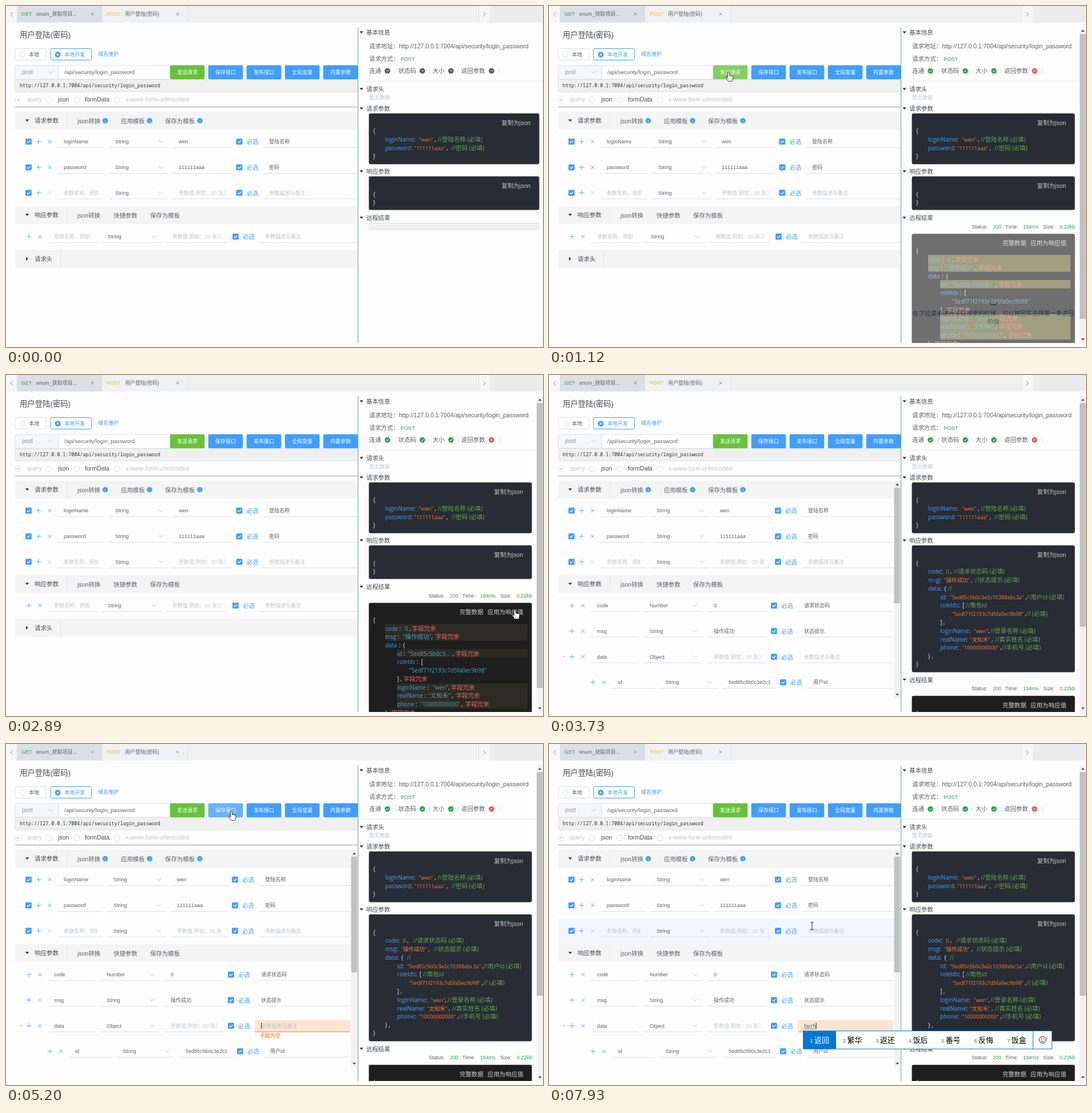
These frames come from a looping animation (939x596 px, 8000 ms). An HTML page:

```html
<!DOCTYPE html>
<html lang="zh-CN">
<head>
<meta charset="utf-8">
<title>API console</title>
<style>
html, body { margin: 0; width: 100%; height: 100%; overflow: hidden; background: #fdfdfd; }
svg { display: block; }
text { white-space: pre; font-kerning: none; font-family: "Liberation Sans", "Noto Sans CJK SC", sans-serif; }
.mono { font-family: "Noto Sans Mono", monospace; }
.code { font-family: "Open Sans", "Noto Sans CJK SC", sans-serif; }
.k { fill: #409eff; } .p { fill: #e8e8e8; } .s { fill: #ff7a2c; font-size: 9.1px; } .c { fill: #5fa850; }
.v { fill: #45a3bd; } .r { fill: #f56c6c; }
</style>
</head>
<body>
<svg id="stage" width="939" height="596"></svg>
<script>
const BLUE = '#409eff', INK = '#606266', DARK = '#4a4c50', PALE = '#c0c4cc', LINE = '#dcdfe6', GREEN = '#28a745';
const USER = 'wen', PERSON = '文知禾', PHONE = '10000000000';
const URL_PATH = '/api/security/login_password', FULL_URL = 'http://127.0.0.1:7004' + URL_PATH;
const MID = 10.45;

// Drawing helpers, all returning SVG markup
const text = (x, y, s, size = 9, fill = INK, more = '') =>
  `<text x="${x}" y="${y}" font-size="${size}" fill="${fill}" ${more}>${s}</text>`;
const centered = (x, y, s, size, fill) => text(x, y, s, size, fill, 'text-anchor="middle"');
const rect = (x, y, x2, y2, fill, stroke = 'none', r = 0, more = '') =>
  `<rect x="${x}" y="${y}" width="${x2 - x}" height="${y2 - y}" rx="${r}" fill="${fill}" stroke="${stroke}" ${more}/>`;
const path = (d, stroke, fill = 'none', w = 1) => `<path d="${d}" stroke="${stroke}" fill="${fill}" stroke-width="${w}"/>`;
const dot = (x, y, r, fill, stroke = 'none') => `<circle cx="${x}" cy="${y}" r="${r}" fill="${fill}" stroke="${stroke}"/>`;
const group = (id, body, more = '') => `<g id="${id}" ${more}>${body}</g>`;
const clip = (x, y, w, h, body) =>
  `<svg x="${x}" y="${y}" width="${w}" height="${h}" viewBox="${x} ${y} ${w} ${h}" overflow="hidden">${body}</svg>`;
const hline = (x, x2, y, color = LINE) => path(`M${x} ${y}H${x2}`, color);
const down = (x, y, r = 3.3, fill = '#303133') => path(`M${x - r} ${y - r / 2}h${2 * r}l${-r} ${r * 1.1}z`, 'none', fill);
const chevron = (x, y) => path(`M${x - 4} ${y - 2}l4 4l4 -4`, PALE);
const cross = (x, y, r, color) => path(`M${x - r} ${y - r}l${2 * r} ${2 * r}m0 ${-2 * r}l${-2 * r} ${2 * r}`, color, 'none', .9);
const plus = (x, y) => path(`M${x - 4.5} ${y}h9m-4.5 -4.5v9`, BLUE, 'none', .8);
const check = (x, y) => rect(x, y - 5.3, x + 10.8, y + 5.3, BLUE, 'none', 1.5) +
  path(`M${x + 2.8} ${y}l2 2.2l3.6 -4`, '#fff', 'none', 1.2);

// Code line: numbers set the next x, strings start with their colour class
function code(y, ...parts) {
  let x = '', out = '';
  for (const p of parts) {
    if (typeof p === 'number') { x = `x="${p}"`; continue; }
    const size = p[0] === 's' ? 9.4 : MID;
    const body = p.slice(1).replace(/[\u4e00-\u9fff]+/g, `<tspan font-size="${size}">$&</tspan>`);
    out += `<tspan ${x} class="${p[0]}">${body}</tspan>`;
    x = '';
  }
  return `<text class="code" y="${y}" font-size="9.9">${out}</text>`;
}

// Parameter row; spans = name, type and value underlines, checkbox x, description underline
function row(y, [n0, n1, t0, t1, v0, v1, c, d0, d1], name, type, value, desc, lead) {
  const field = (x, x2, s, hint) => hline(x, x2, y + 10.5) +
    clip(x, y - 9, x2 - x - 10.5, 18, text(x + 11, y + 3, s || hint, 9, s ? INK : PALE));
  return (lead ? check(34, y) : '') + plus(n0 - 33, y) + cross(n0 - 13.7, y, 3, lead && !name ? PALE : BLUE) +
    field(n0, n1, name, '参数名称、例如') + field(t0, t1, type) + chevron(t1 - 13, y) +
    field(v0, v1, value, '参数值,例如：20 张三') + check(c, y) + text(c + 18, y + 4, '必选', MID, BLUE) +
    field(d0, d1, desc, '参数描述与备注');
}

function sectionHead(y, x2, label, cell, tabs, open = true) {
  return rect(16, y, x2, y + 31, '#f4f4f5') + path(`M${cell}.5 ${y}v31`, '#e4e7ed') +
    (open ? down(37, y + 15) : path(`M35 ${y + 12}v6.6l3.6 -3.3z`, 'none', '#303133')) +
    text(50, y + 19, label, MID, DARK) + tabs.map(([x, s]) => text(x, y + 19.5, s, MID, INK)).join('');
}

function requestSide(x2, spans) {
  return sectionHead(185, x2, '请求参数', 106, [[125, 'json转换'], [201, '应用模板'], [278, '保存为模板']]) +
    [173.5, 251, 339].map(x => dot(x, 200.5, 4.7, BLUE) + centered(x, 203.5, '!', 8, '#fff')).join('') +
    row(237, spans, 'loginName', 'String', USER, '登陆名称', true) +
    row(282, spans, 'password', 'String', '111111aaa', '密码', true) +
    row(326.5, spans, '', 'String', '', '', true) +
    sectionHead(350, x2, '响应参数', 106, [[125, 'json转换'], [188, '快捷参数'], [252, '保存为模板']]);
}

function scrollbar(id, x, y, y2, thumb) {
  return rect(x, y, x + 11, y2, '#f1f1f1') + `<rect id="${id}" x="${x}" y="${y + 12}" width="10.5" height="${thumb}" fill="#c1c1c1"/>` +
    path(`M${x + 2.5} ${y + 8}h6l-3 -3.4z`, 'none', '#505050') + path(`M${x + 2.5} ${y2 - 8}h6l-3 3.4z`, 'none', '#505050');
}

const SPLIT_X = 615;
const topBar = rect(0, 0, 939, 28.5, '#f0f0f1') + rect(0, 0, 19, 28, '#f7f7f7') + rect(19, 0, 167.5, 28.5, '#dcdfe5') +
  rect(168, 0, 317, 28.5, '#eff1f4') + rect(826, 0, 846, 28, '#f7f7f7') + rect(846, 0, 939, 28.5, '#ececed') +
  path('M19.5 0v28M167.5 0v28M317.5 0v28M826.5 0v28', LINE) +
  path('M12 10.5l-4 4l4 4M834.5 10.5l4 4l-4 4', '#808387') +
  text(27, 17, 'GET', 9, GREEN) + text(53, 17, 'enum_获取项目...') + cross(151, 14, 2.4, '#808387') +
  text(176, 17, 'POST', 9, '#ffb428') + text(208, 17, '用户登陆(密码)') + cross(300, 14, 2.4, '#808387');

const button = (x, s, fill, id = '') => rect(x - .3, 103.5, x + 60.3, 128, fill, 'none', 2, id && `id="${id}"`) +
  centered(x + 30, 119, s, 9, '#fff');
const ring = (x, y, r, stroke = LINE) => dot(x, y, r, '#fff', stroke);

const formTop = text(24, 55, '用户登陆(密码)', 13.35, DARK) +
  rect(16, 74.5, 70, 94.5, '#fff', LINE, 2) + ring(28.5, 85, 4.5) + text(40, 88, '本地') +
  rect(78, 74.5, 149.5, 94.5, '#fff', BLUE, 2) + dot(90.5, 85, 5, BLUE) + dot(90.5, 85, 1.8, '#fff') +
  text(102, 88, '本地开发', 9, BLUE) + text(161, 87, '域名维护', 9, BLUE) +
  rect(16, 104, 92, 128, '#f5f7fa', LINE, 2) + text(28, 118.5, 'post', 10, '#909399') + chevron(78, 115.5) +
  rect(92, 104, 288, 128, '#fff', LINE) + text(102, 118.5, URL_PATH, 9.8) +
  button(287, '发送请求', '#67c23a', 'send') + button(354, '保存接口', BLUE, 'save') +
  button(421, '发布接口', BLUE) + button(488, '全局变量', BLUE) + button(555, '内置参数', BLUE) +
  rect(16, 128.5, 615, 150, '#f0f0f0', LINE, 2) + text(24, 142, FULL_URL, 8.37, '#303133', 'class="mono"') +
  [21, 75, 123.5, 194].map(x => ring(x, 164, 5)).join('') + dot(21, 164, 1.5, PALE) +
  text(37, 167, 'query', 10.2, PALE) + text(91, 167, 'json', MID, DARK) + text(138, 167, 'formData', MID, DARK) +
  text(209, 167, 'x-www-form-urlencoded', MID, PALE) + hline(16, SPLIT_X, 176.5, '#999');

const hovers = [215, 260, 305].map((y, i) =>
  rect(16, y, 603, y + 44.5, '#f3f6fb', 'none', 0, `id="hover${i}"`)).join('');

const REQ_WIDE = [90, 172, 180, 284, 291, 395, 402.5, 449, 615], REQ_SLIM = [90, 170, 177, 280, 288, 388, 395, 442, 602];
const RES_WIDE = [73, 160, 167, 272, 280, 387, 396, 442, 615], RES_SLIM = [73, 157, 165, 268, 277, 381, 388, 435, 602];
const RES_CHILD = [110, 186, 193, 294, 303, 397, 404, 451, 602];

const leftBefore = requestSide(SPLIT_X, REQ_WIDE) + row(403, RES_WIDE, '', 'String', '', '') +
  sectionHead(426.5, SPLIT_X, '请求头', 95, [], false);
const leftAfter = requestSide(603, REQ_SLIM) +
  row(403, RES_SLIM, 'code', 'Number', '0', '请求状态码') +
  row(447.5, RES_SLIM, 'msg', 'String', '操作成功', '状态提示') +
  row(492.5, RES_SLIM, 'data', 'Object', '', ' ') + down(26, 492.5, 2.6, PALE) +
  row(537, RES_CHILD, 'id', 'String', '5ed85c5b0c3e2c10388ebc3a', '用户id') +
  scrollbar('leftThumb', 603.5, 185, 565, 202);
const errorField = rect(435, 482.5, 602, 503, '#fde4d0') + hline(435, 602, 503, '#fb8a3c') +
  text(444, 512.5, '不能为空', 9, '#fa6c0c');

const rightHead = (y, s) => down(621.5, y - 4) + text(630, y, s, MID, DARK);
const darkBox = (y, y2, x2, fill = '#282c34') => rect(634.5, y - .3, x2 + .5, y2 + .5, fill, 'none', 3);
const copyLabel = (x, y) => text(x, y, '复制为json', MID, '#c4c6ca', 'text-anchor="end"');

const rightStatic = path('M615.5 37V589', '#5fab9b') + rightHead(50, '基本信息') +
  text(635, 74, '请求地址：', MID) + text(687, 74, FULL_URL, MID) +
  text(635, 95.5, '请求方式：', MID) + text(690, 95.5, 'POST', 9.2, GREEN) +
  [[635, '连通'], [686, '状态码'], [746, '大小'], [796, '返回参数']].map(([x, s]) => text(x, 117, s, MID)).join('') +
  path('M680.5 109v9M740.5 109v9M790.5 109v9M862.5 109v9', LINE) +
  hline(616, 939, 131.5, '#e4e7ed') + rightHead(149, '请求头') + text(635, 163, '暂无数据', 9, PALE) +
  rightHead(183, '请求参数') + rightHead(293, '响应参数');

const requestBox = x2 => darkBox(188, 276, x2) + copyLabel(x2 - 15, 207.5) + code(222, 642, 'p{') +
  code(236.5, 663, 'kloginName', 'p:', 722, `s"${USER}"`, 'p ,', 755, 'c//登陆名称 (必填)') +
  code(251.5, 663, 'kpassword', 'p:', 714, 's"111111aaa"', 'p ,', 779, 'c//密码 (必填)') + code(266, 642, 'p}');
const emptyResponse = x2 => darkBox(298, 356, x2) + copyLabel(x2 - 15, 318) + code(333, 642, 'p{') + code(347, 642, 'p}');
const BADGES = [667, 728, 778, 849];
const rightBefore = BADGES.map(x => dot(x, 113.5, 4.8, '#55575c') + centered(x, 116.5, '?', 8, '#fff')).join('') +
  requestBox(932) + emptyResponse(932) + rightHead(374, '远程结果') + rect(635, 379.5, 932, 390.5, '#f0f0f0', LINE, 2);
const rightAfter = BADGES.map((x, i) => i < 3
  ? dot(x, 113.5, 4.8, GREEN) + path(`M${x - 2.2} 113.5l1.7 1.8l3 -3.4`, '#fff')
  : dot(x, 113.5, 4.8, '#f05656') + cross(x, 113.5, 1.7, '#fff')).join('') +
  requestBox(919) + scrollbar('rightThumb', 928, 37, 589, 498);

const filledResponse = darkBox(298, 519, 919) + copyLabel(904, 318) + code(333, 642, 'p{') +
  code(347, 663, 'kcode', 'p:', 694, 's0', 'p ,') + code(361.5, 663, 'kmsg', 'p:', 691, 's"操作成功"', 'p ,') +
  code(376.5, 663, 'kdata', 'p:', 691, 'p{') +
  group('notes', code(347, 708, 'c//请求状态码 (必填)') + code(361.5, 744.5, 'c//状态提示 (必填)') + code(376.5, 697.5, 'c//')) +
  text(709.5, 376.5, '', 9.9, '#5fa850', 'class="code" id="liveNote"') +
  code(391.5, 684, 'kid', 'p:', 701, 's"5ed85c5b0c3e2c10388ebc3a"', 'p ,', 835, 'c//用户id (必填)') +
  code(406, 684, 'kroleIds', 'p:', 723, 'p[', 729, 'c//角色id') +
  code(421, 705, 's"5edf71f2193c7d5fa0ec9b98"', 'p ,', 835, 'c// (必填)') + code(436, 684, 'p] ,') +
  code(450.5, 684, 'kloginName', 'p:', 743, `s"${USER}"`, 'p,', 772, 'c//登录名称 (必填)') +
  code(465.5, 684, 'krealName', 'p:', 736, `s"${PERSON}"`, 'p ,', 780, 'c//真实姓名 (必填)') +
  code(480, 684, 'kphone', 'p:', 722, `s"${PHONE}"`, 'p ,', 792, 'c//手机号 (必填)') +
  code(494.5, 663, 'p} ,') + code(509, 642, 'p}');

const EXTRA = 'r字段冗余';
const remote = rightHead(374, '远程结果') +
  [[739, 'Status:'], [798, 'Time:'], [864, 'Size:']].map(([x, s]) => text(x, 388.5, s)).join('') +
  [[776, '200'], [829, '194ms'], [893, '0.22kb']].map(([x, s]) => text(x, 388.5, s, 9, GREEN)).join('') +
  darkBox(398.5, 690, 919, '#1e1e1e') + text(793, 418, '完整数据', MID, '#d0d0d0') + text(842, 418, '应用为响应值', MID, '#d0d0d0') +
  group('marks', rect(663, 435, 912, 464.5, '#b9ad55') + rect(684, 479, 912, 493.5, '#b9ad55') + rect(684, 539, 912, 583, '#b9ad55')) +
  code(432, 642, 'p{') + code(446.5, 663, 'kcode', 'p :', 697, 'v0', 'p ,', 710, EXTRA) +
  code(461, 663, 'kmsg', 'p :', 694, 'v"操作成功"', 'p,', 751, EXTRA) + code(476, 663, 'kdata', 687, 'p:', 694, 'p{') +
  code(490.5, 684, 'kid', 'p :', 703, 'v"5ed85c5b0c3...', 781, 'p,', 786, EXTRA) +
  code(505, 684, 'kroleIds', 'p :', 726, 'p[') + code(519.5, 705, 'v"5edf71f2193c7d5fa0ec9b98"') +
  code(534.5, 684, 'p] ,', 695, EXTRA) +
  code(549.5, 684, 'kloginName', 'p :', 746, `v"${USER}"`, 'p,', 778, EXTRA) +
  code(564, 684, 'krealName', 'p :', 738, `v"${PERSON}"`, 'p ,', 787, EXTRA) +
  code(579, 684, 'kphone', 'p :', 724, `v"${PHONE}"`, 'p ,', 803, EXTRA) +
  code(593.5, 663, 'p} ,', 674, EXTRA) +
  group('loading', rect(634.5, 398.2, 919.5, 690, '#fff', 'none', 3, 'opacity=".9"') +
    path('M770 518a8 8 0 0 0 14 0', '#0060b8', 'none', 1.5) +
    centered(777, 540.5, '在下拉菜单进行字段搜索的时候，可以按回车选择第一条返回', MID, '#0060b8') +
    centered(777, 555, '的值', MID, '#0060b8'));

const pointers =
  group('arrow', path('M0 0v12l2.8 -2.6l1.9 4.3l2 -.9l-1.9 -4.1h3.9z', '#222', '#fff', .9)) +
  group('hand', path('M-1.6 1.2q1.6 -2 3 0v5l5 1q2 .6 1.7 2.6l-1 5.5q-.3 1.2 -1.5 1.2h-5q-1.2 0 -1.8 -1l-3.6 -5.4q-.2 -2.2 3.2 .4z', '#222', '#fff', .9)) +
  group('beam', path('M-2.7 -6.5h2l.7 .7l.7 -.7h2M0 -6v12M-2.7 6.5h2l.7 -.7l.7 .7h2', '#222'));

const stage = document.getElementById('stage');
stage.innerHTML = topBar + formTop + hovers + group('leftBefore', leftBefore) + group('leftAfter', leftAfter) +
  group('error', errorField) + text(446, 495.5, '', 9, INK, 'id="note"') +
  `<path id="caret" stroke="#222"/><path id="compose" stroke="#444" stroke-dasharray="1.5 1"/>` +
  clip(0, 0, 939, 589, rightStatic + group('rightBefore', rightBefore) + group('rightAfter', rightAfter) +
    group('emptyResponse', emptyResponse(919)) + group('filledResponse', filledResponse) + group('remote', remote)) +
  group('ime', '') + group('pointer', pointers);

const $ = id => document.getElementById(id);
const show = (id, on) => { $(id).style.display = on ? '' : 'none'; };
const ramp = (t, a, b) => Math.min(1, Math.max(0, (t - a) / (b - a)));
const latest = (steps, t) => steps.filter(s => s[0] <= t).pop() || [0, ''];

const LOOP = 8000, RESULT = 940, APPLY = 3070, INVALID = 4690;
const MOVES = [[0, 945, 38], [100, 945, 38], [600, 314, 115], [1810, 314, 115], [1840, 420, 157], [2450, 890, 410],
  [3540, 890, 410], [3730, 674, 361], [4330, 400, 158], [4500, 394, 117], [5230, 394, 117], [5440, 460, 318], [LOOP, 460, 318]];
const TYPED = [[5650, 'f'], [5830, 'fa'], [6100, 'f'], [6250, ''], [6310, 'f'], [6400, 'fa'], [6550, 'fan'],
  [6850, 'fa'], [7030, 'f'], [7150, '']];
const IME = [[7420, 'f', '分 放 发 非 飞 法 否'], [7540, 'fa', '发 法 罚 阀 乏 伐 筏'],
  [7720, 'fan', '饭 反 翻 烦 返 番 犯'], [7930, "fan'h", '返回 繁华 返还 饭后 番号 反悔 饭盒']];

function imePopup(list) {
  const words = list.split(' '), pitch = 32.2 + 12.6 * words[0].length, end = 444.5 + pitch * words.length;
  return rect(444.5, 501.5, end + 33, 533, '#fff', '#0078d7') + rect(444.5, 501.5, 444.5 + pitch, 533, '#0078d7') +
    words.map((w, i) => {
      const x = 444.5 + i * pitch;
      return text(x + 12, 522, i + 1, 9, i ? '#666' : '#fff') + text(x + 19.5, 522, w, 13, i ? '#000' : '#fff');
    }).join('') + path(`M${end} 501.5v31.5`, '#0078d7') + dot(end + 17, 517, 6, 'none', '#222') +
    dot(end + 14.8, 515.5, .9, '#222') + dot(end + 19.2, 515.5, .9, '#222') + path(`M${end + 13.8} 518.8q3.2 3 6.4 0`, '#222');
}

function pointerAt(t) {
  const i = MOVES.findIndex(m => m[0] > t), [t0, x0, y0] = MOVES[i - 1], [t1, x1, y1] = MOVES[i], k = ramp(t, t0, t1);
  return [x0 + (x1 - x0) * k, y0 + (y1 - y0) * k];
}

let popup = '';
function render(t) {
  const applied = t >= APPLY, ready = t >= RESULT;
  show('leftBefore', !applied);
  show('leftAfter', applied);
  show('rightBefore', !ready);
  show('rightAfter', ready);
  show('emptyResponse', ready && !applied);
  show('filledResponse', applied);
  show('remote', ready);
  $('remote').setAttribute('transform', `translate(0 ${applied ? 162.5 : 0})`);
  $('rightThumb').setAttribute('height', applied ? 391 : 498);
  $('loading').setAttribute('opacity', 1 - ramp(t, RESULT, 1240));
  $('marks').setAttribute('opacity', .73 - .38 * ramp(t, RESULT, 1270) - .26 * ramp(t, 1870, 2440));

  // Form field, its live note and the input method
  const invalid = t >= INVALID, ime = latest(IME, t), typed = latest(TYPED, t)[1], value = ime[1] || typed, note = $('note');
  show('error', invalid);
  $('notes').setAttribute('transform', `translate(${invalid ? 3.5 : 0} 0)`);
  $('liveNote').textContent = typed;
  note.textContent = !applied ? '' : value || '参数描述与备注';
  note.setAttribute('fill', value ? INK : PALE);
  note.setAttribute('font-size', value ? 9.7 : 9);
  const end = 446.5 + (value ? note.getComputedTextLength() : 0);
  $('caret').setAttribute('d', invalid ? `M${end} 487v10.5` : '');
  $('compose').setAttribute('d', ime[1] ? `M446 498H${end}` : '');
  if (popup !== ime[1]) {
    popup = ime[1];
    $('ime').innerHTML = popup ? imePopup(ime[2]) : '';
  }

  // Pointer and hover states
  const [x, y] = pointerAt(t), within = (a, b) => t >= a && t < b;
  $('pointer').setAttribute('transform', `translate(${x} ${y})`);
  const hand = within(580, 1820) || within(2440, 3280) || within(4440, 5260);
  const beam = within(3280, 3850) || t >= 5410;
  show('hand', hand);
  show('beam', beam);
  show('arrow', !hand && !beam);
  [215, 260, 305].forEach((top, i) => show('hover' + i, x < 603 && y >= top && y < top + 45));
  $('send').setAttribute('fill', within(580, 1880) ? '#85ce61' : '#67c23a');
  $('save').setAttribute('fill', within(4440, 5270) ? '#66b1ff' : BLUE);
}

const start = performance.now();
function frame() {
  const t = (performance.now() - start) % LOOP;
  render(Math.max(0, Math.floor((t - 10) / 30) * 30 + 10));
  requestAnimationFrame(frame);
}
frame();
</script>
</body>
</html>
```
